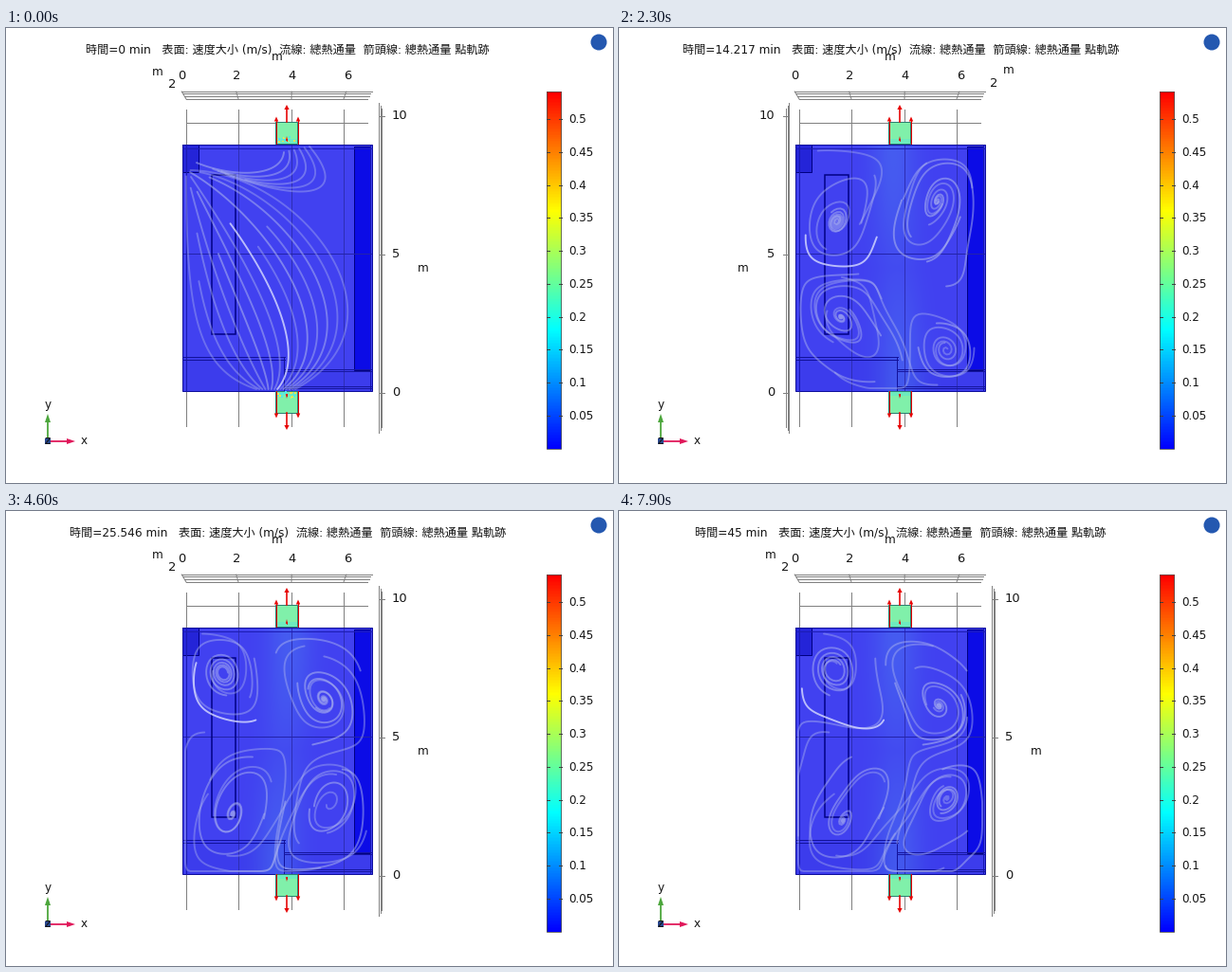
A matplotlib script that plays this animation: 640x480 px, repeating every 8 s.

```python
import numpy as np
import matplotlib.pyplot as plt
from matplotlib.animation import FuncAnimation
from matplotlib.colors import LinearSegmentedColormap
from matplotlib.patches import Circle, Polygon, Rectangle

plt.rcParams["font.family"] = ["DejaVu Sans", "Noto Sans CJK JP"]
FRAMES = 80
INK = "#141414"
GREY = "#808080"
NAVY = "#000082"
RED = "#e60000"
ROOM_ORIGIN = np.array([186, 123])
ROOM_SIZE = np.array([200, 260])

TIME_FRAMES = [0, 16, 30, 46, 57, 70, 79]
TIME_MINUTES = [0, 10.703, 17.731, 25.546, 31.57, 39.168, 45]

LINES = 20
SAMPLES = 100
rng = np.random.default_rng(11)
lengths = rng.uniform(110, 430, LINES)
drift = rng.uniform(-0.25, 0.25, LINES)
opacity = rng.uniform(0.38, 0.55, LINES)
opacity[7] = 0.8
lengths[7] = 120


def bezier(control, t):
    a, b, c, d = np.array(control, float)
    t = t[:, None]
    return (1 - t) ** 3 * a + 3 * t * (1 - t) ** 2 * b + 3 * t ** 2 * (1 - t) * c + t ** 3 * d


def family(first, last, count, latest_start):
    """Blend between two Bezier curves to get a fan of similar ones."""
    first, last = np.array(first), np.array(last)
    starts = rng.uniform(0, latest_start, count)
    return [bezier(first + (last - first) * s, np.linspace(start, 1, SAMPLES))
            for s, start in zip(np.linspace(0, 1, count), starts)]


STILL_AIR = np.array(
    family([(190, 152), (190, 300), (200, 360), (264, 381)],
           [(192, 150), (310, 150), (435, 310), (305, 381)], LINES - 6, 0.4)
    + family([(190, 137), (230, 158), (290, 160), (293, 131)],
             [(205, 143), (300, 185), (370, 185), (320, 125)], 6, 0.3))


def stream_gradient(pos, frame):
    """Gradient of a stream function made of cells that merge along a diagonal."""
    phase = 2 * np.pi * frame / FRAMES
    modes = ((2, 2, 1), (1, 1, -0.25 - 0.35 * frame / FRAMES),
             (2, 1, 0.35 * np.sin(phase)), (3, 4, 0.3 * np.cos(2 * phase)))
    u, v = ((pos - ROOM_ORIGIN) / ROOM_SIZE).T * np.pi
    gx = sum(a * m * np.cos(m * u) * np.sin(n * v) for m, n, a in modes)
    gy = sum(a * n * np.sin(m * u) * np.cos(n * v) for m, n, a in modes)
    return gx / ROOM_SIZE[0], gy / ROOM_SIZE[1]


def direction(pos, frame):
    gx, gy = stream_gradient(pos, frame)
    velocity = np.stack([gy + drift * gx, -gx + drift * gy], axis=1)
    return velocity / (np.linalg.norm(velocity, axis=1, keepdims=True) + 5e-4)


def streamlines(frame):
    i = np.arange(LINES)
    wander = 0.06 * np.sin(6 * np.pi * frame / FRAMES + i)
    seeds = np.stack([(i * 0.618 + 0.1) % 1 * 0.84 + 0.08 + wander, (i + 0.5) / LINES], axis=1)
    pos = ROOM_ORIGIN + seeds * ROOM_SIZE
    step = (lengths / SAMPLES)[:, None]
    path = [pos]
    for _ in range(SAMPLES - 1):
        middle = pos + direction(pos, frame) * step / 2
        pos = pos + direction(middle, frame) * step
        pos = np.clip(pos, ROOM_ORIGIN + 3, ROOM_ORIGIN + ROOM_SIZE - 3)
        path.append(pos)
    swirl = np.stack(path, axis=1)
    mix = min(frame / 5, 1)
    mix = mix * mix * (3 - 2 * mix)
    return STILL_AIR * (1 - mix) + swirl * mix


fig = plt.figure(figsize=(6.4, 4.8), dpi=100, facecolor="white")
ax = fig.add_axes([0, 0, 1, 1])
ax.axis("off")
PX = 0.72  # points per pixel


def line(x0, y0, x1, y1, color=GREY, width=1, z=1):
    return ax.plot([x0, x1], [y0, y1], color=color, lw=width * PX, zorder=z)[0]


def box(x0, y0, x1, y1, fill="none", edge="none", z=3, width=1, **kw):
    ax.add_patch(Rectangle((x0, y0), x1 - x0, y1 - y0, facecolor=fill,
                           edgecolor=edge, lw=width * PX, zorder=z, **kw))


def label(x, y, text, size=13, **kw):
    kw = {"ha": "center", "va": "center", "color": INK, "zorder": 9, **kw}
    return ax.text(x, y, text, fontsize=size * PX, **kw)


def triangle(points, color, z=8):
    ax.add_patch(Polygon(points, color=color, lw=0, zorder=z))


def arrow(x, y0, y1, width=1, head=2.2):
    d = np.sign(y1 - y0)
    line(x, y0, x, y1 - 3 * d, RED, width, 8)
    triangle([(x - head, y1 - 5 * d), (x + head, y1 - 5 * d), (x, y1)], RED)


def draw_axes():
    for x in (190, 245, 301, 356):
        line(x, 86, x, 420)
        line(x, 75, 296 + (x - 296) * 1.045, 67)
    line(190, 100, 381, 100)
    for k, y in enumerate((67, 69, 72, 75)):
        line(185 + 1.7 * k, y, 386 - 1.7 * k, y)
    for k in range(4):
        label(185 + 58.4 * k, 51, str(2 * k))
    label(286, 30, "m", 12)


def draw_side(ruler, inward, tick_x, align, two, depth, unit):
    parts = []
    for k in range(3):
        x = ruler + 1.5 * k * inward
        parts.append(line(x, 85 - 3 * k, x, 421 + 3 * k))
    for value in (0, 5, 10):
        y = 385 - 29.2 * value
        parts.append(line(ruler - 3 * inward, y, ruler + 3 * inward, y))
        parts.append(label(tick_x, y, str(value), ha=align))
    return parts + [label(*two, "2"), label(*depth, "m", 12), label(unit, 253.5, "m", 12)]


def draw_room():
    box(186, 123, 386, 383, "#4141f0", z=2)
    box(367, 125, 384, 361, "#0c0ce6", NAVY)
    box(186, 123, 203, 152, "#2424d8", NAVY)
    box(186, 347, 294, 383, "#3c3cec", z=2.3)
    box(294, 360, 386, 383, "#3c3cec", z=2.3)
    for x in (245, 301, 356):
        line(x, 123, x, 383, "#2e2eb4", z=3)
    line(186, 238, 386, 238, "#2323aa", z=3)
    box(186, 123, 386, 383, edge="#10109b", z=4)
    box(217, 155, 242, 323, edge=NAVY, z=4, width=1.5)
    for x in (190, 384):
        line(x, 123, x, 383, "#1818b0", z=4)
    line(186, 127, 386, 127, "#1c1cb4", z=4)
    for y in (347, 350):
        line(186, y, 294, y, "#12129b", z=4)
    line(293, 347, 293, 383, "#12129b", z=4)
    for y in (360, 362, 378, 380):
        line(293, y, 386, y, "#1616a0", z=4)


def draw_vent(inner, outer):
    d = np.sign(outer - inner)
    box(284, inner, 307, outer, "#80f0aa", z=5)
    box(284, inner, 307, inner + 5 * d, "#5ce8d2", z=5, alpha=0.5)
    box(284, inner, 307, outer, edge="#2b7f70", z=6)
    for x in (285, 308):
        arrow(x, inner, outer + 5.5 * d)
    arrow(296, outer, outer + 18 * d, 1.6, 2.6)
    arrow(296, inner + 3 * d, inner + 8 * d, 0.8, 1.1)


def draw_triad():
    green, pink = "#4ca63c", "#e0185a"
    line(44, 436, 44, 412, green, 1.8)
    line(44, 436, 66, 436, pink, 1.8)
    triangle([(41, 416), (47, 416), (44, 407)], green)
    triangle([(64, 433), (64, 439), (73, 436)], pink)
    box(41, 433, 47, 439, "#28468c")
    label(44, 397, "y", 12)
    label(82, 435.5, "x", 12)
    label(44, 435.5, "z", 12)


def draw_colorbar():
    rainbow = LinearSegmentedColormap.from_list("rainbow4", ["blue", "cyan", "yellow", "red"])
    ax.imshow(np.linspace(1, 0, 256)[:, None], cmap=rainbow, aspect="auto",
              extent=(570, 586, 444, 67), zorder=2)
    box(570, 67, 585, 444, edge="#505050", width=0.8)
    for k in range(1, 11):
        y = 443.5 - 34.75 * k
        line(570, y, 573, y, "#404040", z=4)
        line(583, y, 586, y, "#404040", z=4)
        label(593, y + 0.6, f"{0.05 * k:g}", 12, ha="left")


draw_axes()
right_side = draw_side(396, -1, 407, "left", (175.5, 59.5), (160, 46), 440)
left_side = draw_side(176, 1, 164, "right", (395, 58), (411, 44), 131)
draw_room()
draw_vent(122, 99)
draw_vent(383, 406)
draw_triad()
draw_colorbar()
ax.add_patch(Circle((625, 15), 8.5, color="#2458b0", lw=0))

speckle_y = np.r_[rng.uniform(115, 121, 18), rng.uniform(384, 390, 18)]
speckle = ax.scatter(rng.uniform(286, 306, 36), speckle_y, s=1.5, c=["#f0e650", "#50e6f0"] * 18,
                     marker="s", lw=0, zorder=7)
title = label(297, 26, "", 12.13, va="baseline")
streams = [ax.plot([], [], color="#b0b8ee", alpha=alpha, lw=1.9 * PX, zorder=5,
                   solid_capstyle="round")[0] for alpha in opacity]
streams[7].set_color("#d8dcff")

grid_x, grid_y = np.meshgrid(np.linspace(186, 386, 100), np.linspace(123, 383, 130))
swing = np.cos(np.pi * (grid_y - 123) / 260)
plume_rgba = np.ones(grid_x.shape + (4,)) * np.array([80, 150, 240, 255]) / 255
plume = ax.imshow(plume_rgba, extent=(186, 386, 383, 123), aspect="auto",
                  zorder=2.5, interpolation="bilinear")
ax.set_xlim(0, 640)
ax.set_ylim(480, 0)


def update(frame):
    for stream, path in zip(streams, streamlines(frame)):
        stream.set_data(path[:, 0], path[:, 1])

    center = 293 + 8 * np.sin(2 * np.pi * frame / 40) * swing
    glow = np.exp(-((grid_x - center) / 24) ** 2) * (0.4 + 0.6 * abs(swing))
    plume_rgba[..., 3] = 0.32 * min(frame / 10, 1) * glow
    plume.set_data(plume_rgba)
    speckle.set_alpha(max(0, 1 - frame / 8))

    on_left = 8 <= frame < 38
    for part in left_side:
        part.set_visible(on_left)
    for part in right_side:
        part.set_visible(not on_left)
    minutes = np.interp(frame, TIME_FRAMES, TIME_MINUTES)
    title.set_text(f"時間={minutes:.5g} min   表面: 速度大小 (m/s)  "
                   "流線: 總熱通量  箭頭線: 總熱通量 點軌跡")
    return [title, plume, speckle, *streams, *left_side, *right_side]


anim = FuncAnimation(fig, update, frames=FRAMES, interval=100, repeat=True, repeat_delay=0)
plt.show()
```
